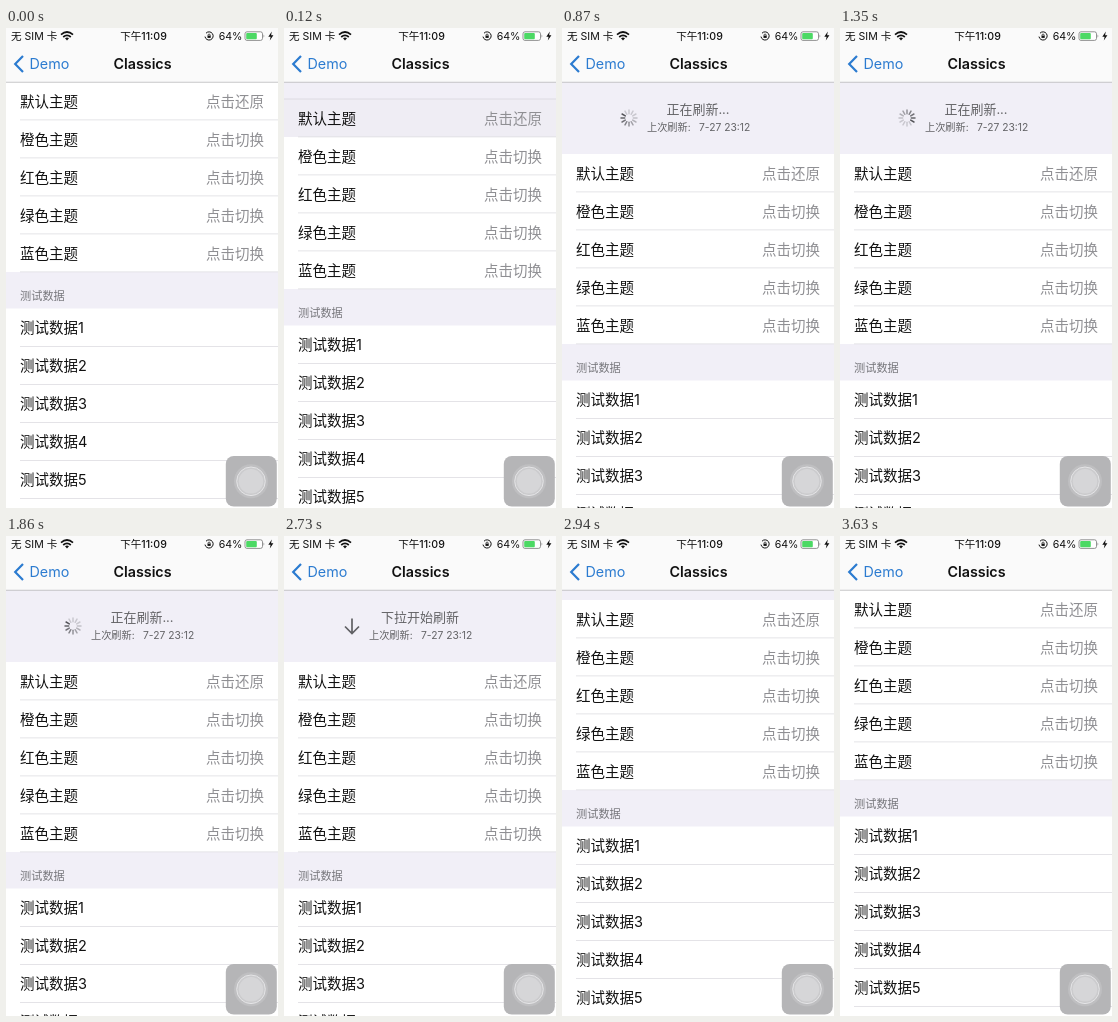
Write an HTML page that moves like this. It is 272 by 480 pixels and loops after 3.72 s.

```html
<!DOCTYPE html>
<html lang="zh-CN">
<head>
<meta charset="utf-8">
<title>Pull to refresh</title>
<style>
html, body { margin: 0; width: 100%; height: 100%; overflow: hidden; background: #fff; }
svg { display: block; width: 272px; height: 480px; }
text { font-family: Inter, "Noto Sans CJK SC", "Noto Sans CJK", sans-serif; white-space: pre; }
.row { font-size: 14.5px; fill: #111; }
.action { font-size: 14.5px; fill: #8f8f93; text-anchor: end; }
.mid { text-anchor: middle; }
.status { font-size: 10.6px; fill: #111; }
</style>
</head>
<body>
<svg viewBox="0 0 272 480">
  <rect width="272" height="480" fill="#f1eff7"/>
  <g id="list">
    <g fill="#636366">
      <text id="title" class="mid" x="136" y="13.5" font-size="13"></text>
      <text x="85" y="30.6" font-size="10.2">上次刷新:</text>
      <text x="188.3" y="30.6" font-size="10.3" text-anchor="end">7-27 23:12</text>
    </g>
    <path id="arrow" d="M68 10.5V25.5M61 18.5L68 25.5L75 18.5" fill="none" stroke="#606064" stroke-width="1.7"/>
    <g id="spinner" transform="translate(67 18)"></g>
    <rect y="54" width="272" height="190" fill="#fff"/>
    <rect y="280.5" width="272" height="300" fill="#fff"/>
    <g id="rows"></g>
    <text x="14" y="272.2" font-size="11.2" fill="#75757a">测试数据</text>
  </g>

  <rect width="272" height="54" fill="#fafafa"/>
  <rect y="53.8" width="272" height=".8" fill="#b9b9bc"/>
  <text class="status" x="5" y="12">无 SIM 卡</text>
  <text class="status mid" x="137.5" y="12" font-weight="500">下午11:09</text>
  <text class="status" x="236.5" y="12" text-anchor="end">64%</text>
  <g fill="none" stroke="#111" stroke-width="1.7">
    <path d="M55 6.6Q61 1.4 67 6.6M57.2 9Q61 5.7 64.8 9"/>
    <path d="M59 10.3Q61 8.8 63 10.3L61 12.4Z" fill="#111" stroke="none"/>
    <path d="M200 5.2A4.1 4.1 0 1 1 199 8.6" stroke-width="1"/>
    <path d="M202 7.7V7.2A1.1 1.1 0 0 1 204.2 7.2V7.7" stroke-width=".7"/>
    <rect x="201.5" y="7.6" width="3.2" height="2.3" fill="#111" stroke="none"/>
  </g>
  <rect x="239" y="3.8" width="17.5" height="8.6" rx="2" fill="#fff" stroke="#777" stroke-width=".8"/>
  <rect x="240.2" y="5" width="10.6" height="6.2" rx="1" fill="#4cd964"/>
  <path d="M257.6 6.5Q259.2 8.1 257.6 9.7Z" fill="#777"/>
  <path d="M265.8 3.6L262.3 8.7H264.6L263.8 12.6L267.4 7.3H265.1Z" fill="#111"/>
  <path d="M17 28L9.2 36L17 44" fill="none" stroke="#2b7bd0" stroke-width="2.2"/>
  <text x="23.5" y="41" font-size="14.3" fill="#2b7bd0">Demo</text>
  <text class="mid" x="136.5" y="41" font-size="14.3" font-weight="600" fill="#111">Classics</text>

  <rect x="219.8" y="428" width="51" height="50.5" rx="8" fill="#b5b5b7"/>
  <circle cx="245" cy="453.3" r="17" fill="#bfbfc1"/>
  <circle cx="245" cy="453.3" r="14.3" fill="#cbcbcd" stroke="#e4e4e6"/>
  <circle cx="245" cy="453.3" r="12.2" fill="#d6d6d8"/>
</svg>
<script>
const LOOP = 3720, PULL = 72, SLIDE = 300, OPEN = 20, CLOSE = 2719;
const ROW = 38, PETALS = 12;
const $ = id => document.getElementById(id);

function add(parent, tag, attrs, text) {
  const el = document.createElementNS("http://www.w3.org/2000/svg", tag);
  for (const k in attrs) el.setAttribute(k, attrs[k]);
  if (text) el.textContent = text;
  return parent.appendChild(el);
}

function addRow(top, label, action) {
  add($("rows"), "rect", { x: 14, y: top + ROW - .5, width: 258, height: .8, fill: "#dedde2" });
  add($("rows"), "text", { class: "row", x: 14, y: top + 24.5 }, label);
  if (action) add($("rows"), "text", { class: "action", x: 258, y: top + 24.5 }, action);
}

const glow = add($("rows"), "g", {});
add(glow, "rect", { y: 54, width: 272, height: ROW, fill: "#efedf4" });
add(glow, "rect", { y: 53.6, width: 272, height: .8, fill: "#d6d5db" });

["默认", "橙色", "红色", "绿色", "蓝色"].forEach((name, i) =>
  addRow(54 + ROW * i, name + "主题", i ? "点击切换" : "点击还原"));
for (let i = 0; i < 6; i++) addRow(280.5 + ROW * i, "测试数据" + (i + 1));

const petals = Array.from({ length: PETALS }, (_, i) => add($("spinner"), "path", {
  d: "M0 -4.3V-8", stroke: "#55555a", "stroke-width": 1.5, "stroke-linecap": "round",
  transform: `rotate(${i * 360 / PETALS})`
}));

const clamp = v => Math.max(0, Math.min(1, v));

// cubic-bezier(.42, 0, .58, 1), solved by bisection
function ease(x) {
  let lo = 0, hi = 1;
  for (let i = 0; i < 20; i++) {
    const s = (lo + hi) / 2, r = 1 - s;
    if (1.26 * r * r * s + 1.74 * r * s * s + s * s * s < x) lo = s;
    else hi = s;
  }
  return lo * lo * (3 - 2 * lo);
}

const slide = (t, start) => ease(clamp((t - start) / SLIDE));

function draw(t) {
  const y = Math.round(PULL * (slide(t, OPEN) - slide(t, CLOSE)));
  const busy = t >= OPEN + SLIDE && t < CLOSE;
  $("list").setAttribute("transform", `translate(0 ${y})`);
  $("title").textContent = busy ? "正在刷新..." : "下拉开始刷新";
  $("arrow").style.display = busy ? "none" : "";
  $("spinner").style.display = busy ? "" : "none";
  glow.style.opacity = t < OPEN ? 0 : 1 - clamp((t - 250) / 350);

  const head = Math.floor(t / 1000 * PETALS);
  petals.forEach((p, i) => {
    const age = (head - i + PETALS * 4) % PETALS;
    p.style.opacity = Math.max(.25, 1 - age * .1);
  });
}

function tick(now) {
  draw(now % LOOP);
  requestAnimationFrame(tick);
}
draw(0);
requestAnimationFrame(tick);
</script>
</body>
</html>
```
